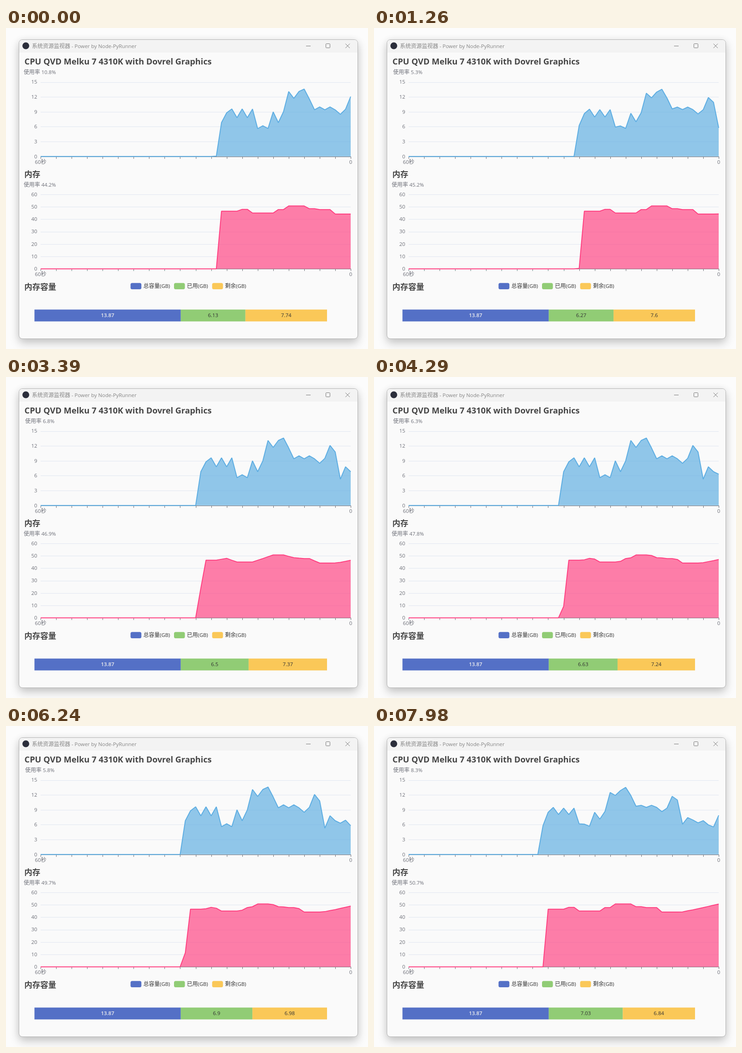
These frames come from a looping animation (795x704 px, 8 s). An HTML page:

```html
<!DOCTYPE html>
<html lang="zh-CN">
<head>
<meta charset="utf-8">
<title>系统资源监视器</title>
<style>
  html, body { margin: 0; width: 100%; height: 100%; overflow: hidden; background: #fcfcfc; }
  .window {
    position: absolute; left: 28px; top: 25px; width: 743px; height: 655px;
    border: 1px solid #b4b4b4; border-radius: 8px; overflow: hidden; background: #fafafa;
    box-shadow: 0 9px 20px rgba(0, 0, 0, .21), 0 0 16px rgba(0, 0, 0, .05);
  }
  .bar { height: 28px; background: #f3f3f3; }
  svg { position: absolute; left: 0; top: 0; display: block; }
  text { font: 12px "Open Sans", "Noto Sans CJK SC", "Noto Sans CJK", sans-serif; fill: #6e7079; white-space: pre; }
  .latin { font-size: .95em; }
  .heading { font-size: 17.5px; font-weight: 700; fill: #464646; }
  .caption { fill: #858585; }
  .legend { fill: #333; }
  .light { fill: #eee; font-weight: 600; }
</style>
</head>
<body>
<div class="window"><div class="bar"></div></div>
<svg id="stage" width="795" height="704" viewBox="0 0 795 704"></svg>
<script>
const LOOP = 8000, STEP = 30, MORPH = 500;
const LEFT = 76, RIGHT = 757, POINTS = 60, FIRST = 35;
const TOTAL_GB = 13.873, BAR_TOP = 617.5, BAR_LEFT = 62.5, BAR_SPLIT = 383.8, BAR_END = 705;
const stage = document.getElementById('stage');

function add(tag, attrs) {
  const node = document.createElementNS('http://www.w3.org/2000/svg', tag);
  for (const key in attrs) node.setAttribute(key, attrs[key]);
  return stage.appendChild(node);
}

function setText(node, value) {
  if (node.shown === value) return;
  node.shown = value;
  node.replaceChildren(...value.split(/([\u4e00-\u9fff]+)/).filter(Boolean).map(part => {
    const span = document.createElementNS(node.namespaceURI, 'tspan');
    if (!/[\u4e00-\u9fff]/.test(part)) span.setAttribute('class', 'latin');
    span.textContent = part;
    return span;
  }));
}

function label(x, y, value, anchor = 'start', cls = '') {
  const node = add('text', { x, y, 'text-anchor': anchor, class: cls });
  setText(node, value);
  return node;
}

const rect = (x, y, width, height, fill, rx = 0) => add('rect', { x, y, width, height, fill, rx });
const stroke = (d, color, width = 1) =>
  add('path', { d, fill: 'none', stroke: color, 'stroke-width': width, 'stroke-linejoin': 'bevel' });

const mix = (a, b, p) => a + (b - a) * p;
const crisp = v => Math.round(v) + .5;
const ease = p => p < .5 ? 4 * p ** 3 : 1 - 4 * (1 - p) ** 3;

// Past load: each phase [start, level, swing] zigzags around its level.
function history(length, phases) {
  return Array.from({ length }, (_, i) => {
    const [start, level, swing = 0] = phases.findLast(phase => phase[0] <= i);
    return level + swing * (-1) ** (i - start);
  });
}

// One new reading per period; it morphs in over MORPH ms.
function makeSeries({ offset, period, past, live }) {
  const values = [...past, ...live];
  return time => {
    const count = Math.max(0, Math.floor((time - offset) / period) + 1);
    const age = time - offset - (count - 1) * period;
    const p = count ? ease(Math.min(1, age / MORPH)) : 1;
    const at = i => values[i + count - FIRST] ?? 0;
    return { latest: at(POINTS), shown: i => mix(at(i - 1), at(i), p) };
  };
}

const cpu = makeSeries({
  offset: -66, period: 964,
  past: history(25, [[0, 7.8, -1], [2, 8.7, .9], [7, 5.9, -.3], [10, 7.9, 1.1],
    [13, 12.4, .7], [16, 12.6, 1], [18, 9.7, -.3], [23, 9, -.5]]),
  live: [12.1, 10.8, 5.3, 7.8, 6.8, 6.3, 6.9, 5.8, 5.5, 8.3]
});

const memory = makeSeries({
  offset: 232, period: 968.5,
  past: history(26, [[0, 46.5], [4, 48], [6, 45], [11, 47.8], [13, 50.7], [17, 48.5], [19, 47.8], [22, 44.2]]),
  live: [44.3, 45.2, 45.92, 46.87, 47.8, 48.74, 49.72, 50.6, 50.7]
});

function makeChart({ top, bottom, max, tick, color, series }) {
  const toX = i => mix(LEFT, RIGHT, i / POINTS);
  const toY = v => mix(bottom, top, v / max);
  for (let v = 0; v <= max; v += tick) {
    stroke(`M${LEFT} ${crisp(toY(v))}H${RIGHT}`, v ? '#e0e6f1' : '#6e7079');
    label(68.5, toY(v) + 3.8, String(v), 'end');
  }
  for (let i = 0; i <= POINTS; i += 3) stroke(`M${crisp(toX(i))} ${Math.round(bottom)}v5`, '#6e7079');
  label(LEFT, bottom + 16.2, '60秒', 'middle');
  label(RIGHT, bottom + 16.2, '0', 'middle');
  const usage = label(74.3, top - 17.2, '', 'middle');
  const area = add('path', { fill: color, 'fill-opacity': .67 });
  const line = stroke('', color, 2);

  return time => {
    const { latest, shown } = series(time);
    const points = Array.from({ length: POINTS + 1 }, (_, i) => `${toX(i).toFixed(2)} ${toY(shown(i)).toFixed(2)}`);
    const d = 'M' + points.join('L');
    line.setAttribute('d', d);
    area.setAttribute('d', `${d}V${bottom}H${LEFT}Z`);
    setText(usage, `使用率 ${latest.toFixed(1)}%`);
  };
}

// Title bar
add('circle', { cx: 43.5, cy: 39, r: 7.5, fill: '#2b2e3b' });
label(57, 44, '系统资源监视器 - Power by Node-PyRunner', 'start', 'caption');
stroke('M659 39.5h10M745.5 34.5l9.5 9.5m0-9.5l-9.5 9.5', '#777');
add('rect', { x: 702.5, y: 34.5, width: 9, height: 9, rx: 1, fill: 'none', stroke: '#777' });

// Headings
label(40.5, 80, 'CPU QVD Melku 7 4310K with Dovrel Graphics', 'start', 'heading').style.fontSize = '19.25px';
label(40.3, 327, '内存', 'start', 'heading');
label(40.3, 573.5, '内存容量', 'start', 'heading');

const drawCpu = makeChart({ top: 118.6, bottom: 281.7, max: 15, tick: 3, color: '#5dade2', series: cpu });
const drawMemory = makeChart({ top: 365, bottom: 528.2, max: 60, tick: 10, color: '#ff4081', series: memory });

// Capacity bar
const BLUE = '#5470c6', GREEN = '#91cc75', YELLOW = '#fac858';
[[273.5, '总容量(GB)', BLUE], [369, '已用(GB)', GREEN], [452.7, '剩余(GB)', YELLOW]]
  .forEach(([x, name, color]) => {
    rect(x, 559.2, 23.8, 13.8, color, 3.5);
    label(x + 28.3, 569.5, name, 'start', 'legend');
  });

function makeSegment(color, cls = 'legend') {
  const box = rect(0, BAR_TOP, 0, 26, color);
  const text = label(0, BAR_TOP + 16.5, '', 'middle', cls);
  return (from, to, gb) => {
    box.setAttribute('x', from);
    box.setAttribute('width', to - from);
    text.setAttribute('x', (from + to) / 2);
    setText(text, String(+gb.toFixed(2)));
  };
}
const drawTotal = makeSegment(BLUE, 'light');
const drawUsed = makeSegment(GREEN);
const drawFree = makeSegment(YELLOW);

function drawCapacity(time) {
  const { latest, shown } = memory(time);
  const used = latest / 100 * TOTAL_GB;
  const edge = mix(BAR_SPLIT, BAR_END, shown(POINTS) / 100);
  drawTotal(BAR_LEFT, BAR_SPLIT, TOTAL_GB);
  drawUsed(BAR_SPLIT, edge, used);
  drawFree(edge, BAR_END, TOTAL_GB - used);
}

const begin = performance.now();
function render() {
  const time = Math.floor((performance.now() - begin) % LOOP / STEP) * STEP;
  drawCpu(time);
  drawMemory(time);
  drawCapacity(time);
  requestAnimationFrame(render);
}
render();
</script>
</body>
</html>
```
